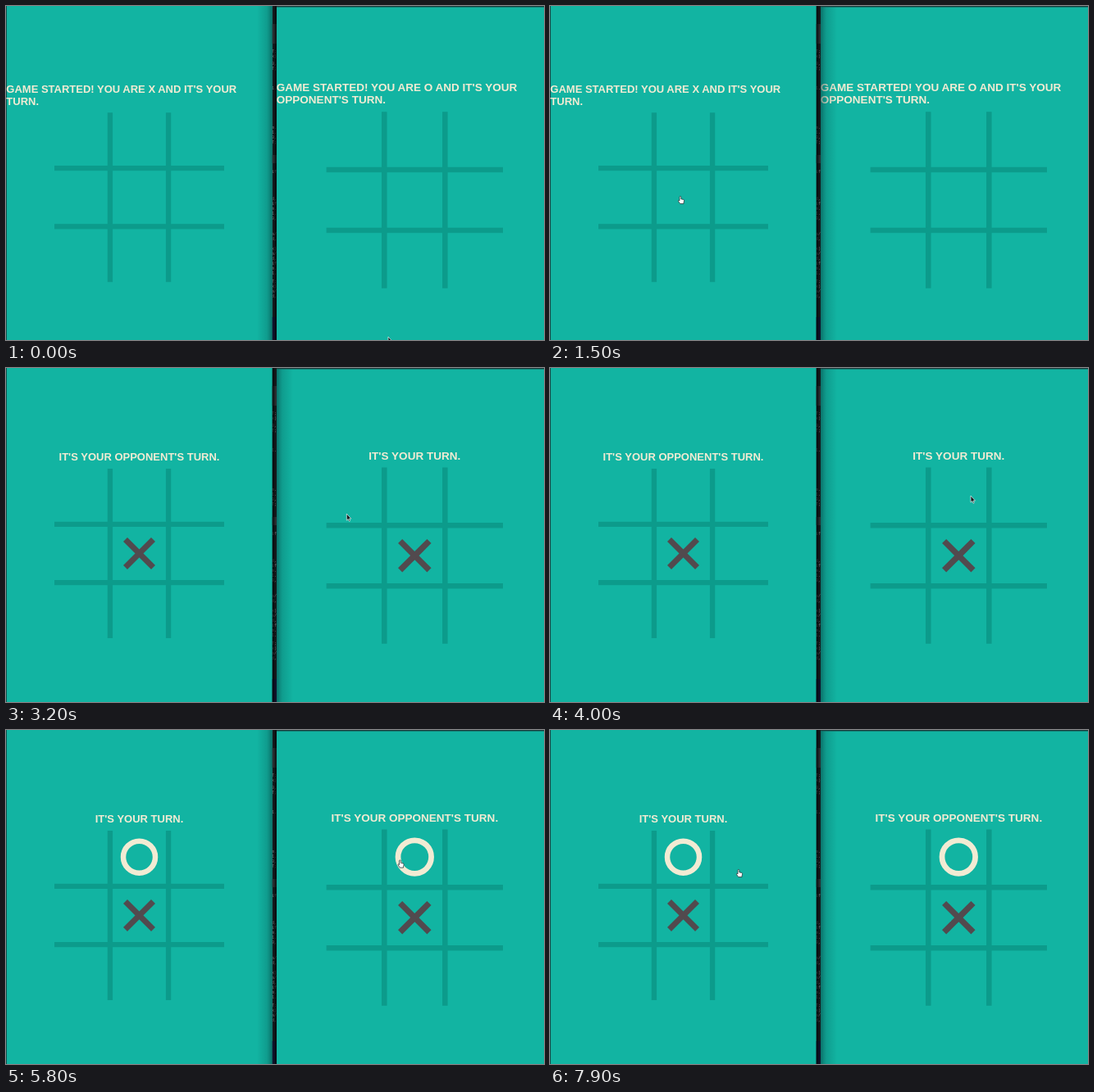
Animation, 656 px wide and 408 px high, one loop 8 s. Source, as an HTML page:

```html
<!DOCTYPE html>
<html lang="en">
<head>
<meta charset="utf-8">
<title>Tic-tac-toe in two windows</title>
<style>
  html, body { margin: 0; width: 100%; height: 100%; overflow: hidden; background: #12b4a2; }
  svg { display: block; width: 656px; height: 408px; }
  .status { font: bold 13px "Liberation Sans", Arial, sans-serif; fill: #f2ebd3; }
  .code { font: 5px "Liberation Mono", "DejaVu Sans Mono", monospace; fill: #8d9295; }
  .grid { fill: none; stroke: #0c9b8b; stroke-width: 6.3; }
  .x { fill: none; stroke: #524a4e; stroke-width: 7; }
  .o { fill: none; stroke: #f2ebd3; stroke-width: 6.5; }
</style>
</head>
<body>
<svg id="stage" viewBox="0 0 656 408" xmlns="http://www.w3.org/2000/svg">
  <defs>
    <linearGradient id="fadeLeft" x1="1" x2="0">
      <stop offset="0" stop-color="#032f30" stop-opacity=".5"/>
      <stop offset=".35" stop-color="#064a48" stop-opacity=".22"/>
      <stop offset="1" stop-color="#064a48" stop-opacity="0"/>
    </linearGradient>
    <linearGradient id="fadeRight">
      <stop offset="0" stop-color="#032f30" stop-opacity=".5"/>
      <stop offset=".35" stop-color="#064a48" stop-opacity=".22"/>
      <stop offset="1" stop-color="#064a48" stop-opacity="0"/>
    </linearGradient>
    <clipPath id="gap"><rect x="324.5" width="5.5" height="408"/></clipPath>
  </defs>

  <rect width="656" height="408" fill="#12b4a2"/>
  <rect width="1" height="408" fill="#12504d"/>
  <rect x="330" width="326" height="1.4" fill="#173b3b"/>
  <g id="boards"></g>

  <g clip-path="url(#gap)">
    <rect x="324.5" width="5.5" height="408" fill="#15191c"/>
    <rect x="324.5" y="22" width="5.5" height="24" fill="#292d30"/>
    <rect x="324.5" y="182" width="5.5" height="10" fill="#292d30"/>
    <rect x="324.5" y="380" width="5.5" height="28" fill="#10122b"/>
    <g id="code" class="code" opacity=".75"></g>
    <rect id="gapShade" x="324.5" width="3" height="408" fill="#05080a" opacity=".55"/>
  </g>

  <rect id="shadowLeft" x="306" width="18.5" height="408" fill="url(#fadeLeft)"/>
  <rect id="shadowRight" x="330" y="1.4" width="20" height="406.6" fill="url(#fadeRight)"/>

  <path id="arrow" d="M0 0V8.2L1.8 6.6 3 9.3 4.3 8.7 3.1 6.1H5.5Z"
        fill="#151b1e" stroke="#e8f4f2" stroke-width=".7"/>
  <path id="hand" fill="#fff" stroke="#28383a" stroke-width=".8"
        d="M-1 1.4Q-1 .4-.1 .4T.8 1.4V3.8L3.6 4.4Q4.6 4.7 4.6 5.7L4 8.3V9.6H-.3L-2.5 6.4Q-2.8 5.4-1.9 5.3L-1 6Z"/>
</svg>

<script>
const LOOP = 8000, STEP = 100;
const NS = "http://www.w3.org/2000/svg";
const $ = id => document.getElementById(id);
const clamp = v => Math.max(0, Math.min(1, v));

function add(parent, tag, attrs, text) {
  const el = document.createElementNS(NS, tag);
  for (const k in attrs) el.setAttribute(k, attrs[k]);
  if (text) el.textContent = text;
  parent.appendChild(el);
  return el;
}

const show = (el, on) => el.setAttribute("visibility", on ? "visible" : "hidden");

// All coordinates inside a board are relative to its centre.
function makeBoard({ cx, cy, drop, scale, left, introY, turnY, second, turns, xStart, oStart, oLength }) {
  const root = $("boards");
  const size = 13 * scale;
  const style = `font-size:${size}px`;
  const intro = add(root, "g", { class: "status", style });
  add(intro, "text", { x: left, y: introY },
    `GAME STARTED! YOU ARE ${turns[0] ? "X" : "O"} AND IT'S YOUR`);
  add(intro, "text", { x: left, y: introY + 15 }, second);
  const status = add(root, "text", { class: "status", style, x: cx, y: turnY, "text-anchor": "middle" });

  const board = add(root, "g", {});
  add(board, "path", { class: "grid",
    d: "M-35.6-103.5V103.5M35.6-103.5V103.5M-103.5-35.6H103.5M-103.5 35.6H103.5" });
  const strokes = ["M-17-17L17 17", "M17-17L-17 17"].map(d =>
    add(board, "path", { class: "x", d, pathLength: 1 }));
  const ring = add(board, "path", { class: "o", pathLength: 1,
    d: "M19.5-71.3A19.5 19.5 0 0 1-19.5-71.3A19.5 19.5 0 0 1 19.5-71.3" });

  function trace(el, p) {
    p = clamp(p);
    show(el, p > 0);
    el.setAttribute("stroke-dasharray", p < 1 ? `${p} 2` : "none");
  }

  return t => {
    const started = t >= xStart;
    show(intro, !started);
    show(status, started);
    const mine = t >= oStart ? turns[0] : !turns[0];
    status.textContent = mine ? "IT'S YOUR TURN." : "IT'S YOUR OPPONENT'S TURN.";
    board.setAttribute("transform",
      `translate(${cx} ${cy + (started ? 0 : drop)}) scale(${scale})`);
    const p = (t - xStart + 50) / 400 * 2;
    strokes.forEach((s, i) => trace(s, started ? p - i : 0));
    trace(ring, (t - oStart + 50) / oLength);
  };
}

const boards = [
  { cx: 162.5, cy: 226.5, drop: 7.2, scale: 1, left: .3, introY: 105.6, turnY: 113,
    second: "TURN.", turns: [true], xStart: 1900, oStart: 5100, oLength: 350 },
  { cx: 498.3, cy: 229.2, drop: 7.8, scale: 1.04, left: 329.8, introY: 104, turnY: 111.8,
    second: "OPPONENT'S TURN.", turns: [false], xStart: 1950, oStart: 5100, oLength: 300 }
].map(makeBoard);

// Slivers of an editor behind the windows.
const scraps = ["T;", "m.", "a/", "0,", "if", "x)", "1.", "d,"];
[[57, 2], [72, 2], [102, 1], [150, 4], [204, 1], [237, 5], [280, 2], [298, 6], [338, 4]]
  .forEach(([y, n], i) => {
    for (let k = 0; k < n; k++)
      add($("code"), "text", { x: 324, y: y + k * 6 }, scraps[(i * 3 + k * 5) % scraps.length]);
  });

// Pointer hot spot: time, x, y.
const path = [
  [0, 466, 404], [300, 569, 262], [500, 420, 74], [800, 64, 190], [1100, 130, 225],
  [1500, 159, 232], [2700, 159, 232], [3500, 534, 153], [3600, 534, 153], [3800, 545, 153],
  [4000, 513, 156], [4500, 498, 157], [5700, 498, 157], [6400, 183, 185], [6600, 222, 170],
  [6800, 231, 170], [6900, 231, 170], [7000, 230, 169.6], [7800, 230, 169.6], [7900, 230, 170],
  [LOOP, 230, 170]
];
const within = (t, spans) => spans.some(([a, b]) => t >= a && t < b);
const handTimes = [[1300, 3000], [4800, 5900], [7900, LOOP]];
const leftActive = [[1100, 4600], [7300, LOOP]];

function pointerAt(t) {
  const i = path.findIndex(k => k[0] > t);
  const [t0, x0, y0] = path[i - 1], [t1, x1, y1] = path[i];
  const u = (t - t0) / (t1 - t0), e = u * u * (3 - 2 * u);
  return [x0 + (x1 - x0) * e, y0 + (y1 - y0) * e];
}

function draw(t) {
  boards.forEach(update => update(t));
  const left = within(t, leftActive), hand = within(t, handTimes);
  show($("shadowLeft"), !left);
  show($("shadowRight"), left);
  $("gapShade").setAttribute("x", left ? 324.5 : 327.5);
  const [x, y] = pointerAt(t);
  for (const id of ["arrow", "hand"]) {
    $(id).setAttribute("transform", `translate(${x} ${y})`);
    show($(id), (id === "hand") === hand);
  }
}

const start = performance.now();
function tick() {
  const t = (performance.now() - start) % LOOP;
  draw(Math.floor(t / STEP) * STEP);
  requestAnimationFrame(tick);
}
tick();
</script>
</body>
</html>
```
